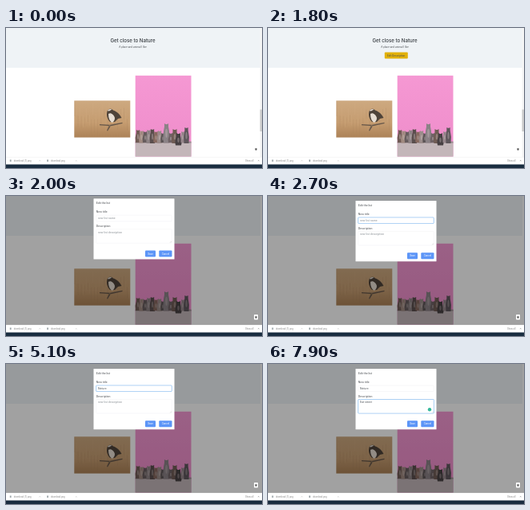
Animation of 320 by 176 pixels, one loop 8000 ms. Source, as an HTML page:

```html
<!DOCTYPE html>
<html lang="en">
<head>
<meta charset="utf-8">
<title>Edit the list</title>
<style>
  html, body { margin: 0; width: 100%; height: 100%; overflow: hidden; background: #fff; }
  svg { display: block; width: 100vw; height: 100vh; }
  text { font: 3.5px Roboto, "Liberation Sans", sans-serif; fill: #4b4f53; white-space: pre; }
  .mid { text-anchor: middle; }
  .heading { font: 500 6.1px Inter, sans-serif; fill: #33383d; }
  .sub { font: 3.05px Inter, sans-serif; }
  .bar text { font-size: 2.8px; fill: #888; }
  .button text { fill: #fff; font-size: 3.1px; }
  .field { fill: #fff; stroke-width: .45; }
</style>
</head>
<body>
<svg viewBox="0 0 320 176" preserveAspectRatio="none">
  <defs>
    <linearGradient id="reeds" x2="0" y2="1">
      <stop offset="0" stop-color="#cda980"/>
      <stop offset=".6" stop-color="#c59c70"/>
      <stop offset="1" stop-color="#ac8257"/>
    </linearGradient>
    <linearGradient id="wall" x2="0" y2="1">
      <stop offset="0" stop-color="#f598d3"/>
      <stop offset="1" stop-color="#ee8cca"/>
    </linearGradient>
  </defs>

  <rect width="320" height="176" fill="#fff"/>
  <rect width="318" height="50" fill="#eff3f6"/>
  <text class="heading mid" x="158.5" y="18.4">Get close to Nature</text>
  <text class="sub mid" x="158.5" y="25">A place and animal I like</text>
  <g id="edit">
    <rect id="editFace" x="145.8" y="30.6" width="29" height="7.900" rx="1"/>
    <text class="mid" x="160.2" y="35.7" style="font-size:3.2px">Edit Description</text>
  </g>

  <g>
    <rect x="85.300" y="91.300" width="70" height="46.300" fill="url(#reeds)"/>
    <g id="stalks" stroke-width=".5"/>
    <path d="M117 121L130 121.800L145.500 118.800V120L131 123.300L117 122.200Z M129 122.500L126 129L127 129.500L131 123Z" fill="#66574a"/>
    <path d="M127 103.500C129 101 132.500 101.500 134 103.500C138 104.500 142 108 144.500 113L140 114L136 118L130 118C126 114 125 108 127 103.500Z" fill="#4e4339"/>
    <path d="M128 108C131 106 135 109 136 113Q136 117 132.500 119Q128 116 128 108Z M126.800 104Q129 101 132.500 102.500L128.500 104.500Z" fill="#e6ddd2"/>
  </g>

  <g>
    <rect x="161.700" y="59.800" width="69.800" height="101.800" fill="url(#wall)"/>
    <rect x="161.700" y="143" width="69.800" height="18.600" fill="#c3b6b9"/>
    <rect x="161.700" y="142.600" width="69.800" height="2" fill="#9c8b91"/>
    <g id="animals"/>
  </g>

  <g id="scrollbar">
    <rect x="317.5" width="2.5" height="162" fill="#f5f5f5"/>
    <rect x="317.6" y="102.500" width="2.200" height="27.500" fill="#c8c8c8"/>
  </g>

  <rect id="shade" width="320" height="162"/>
  <rect x="310" y="149" width="5" height="6.6" rx=".8" fill="#fff"/>
  <path d="M311.400 151.300H313.600V153.200H312.800V154H312V153.200H311.400Z" fill="#555"/>

  <g id="modal">
    <rect x="109.500" y="6" width="101" height="76.300" rx=".6" fill="#fff"/>
    <text x="112.8" y="13">Edit the list</text>
    <text x="112.8" y="24.200">New title</text>
    <rect class="field" id="titleBox" x="112.700" y="27" width="94.500" height="7.600" rx=".8"/>
    <text id="titleText" x="115" y="32"/>
    <text x="112.8" y="41.700">Description</text>
    <rect class="field" id="noteBox" x="112.700" y="44.500" width="94.700" height="17.500" rx=".8"/>
    <text id="noteText" x="115" y="49.400"/>
    <path d="M205.200 61.200L206.700 59.700M206 61.200L206.700 60.500" stroke="#888" stroke-width=".25"/>
    <circle id="helper" cx="202" cy="57.300" r="2.200" fill="#35b99b"/>
    <g class="button">
      <rect x="174" y="71.300" width="13" height="7.900" rx="1" fill="#5c95f7"/>
      <text class="mid" x="180.500" y="76.300">Save</text>
      <rect x="191.300" y="71.300" width="16.200" height="7.900" rx="1" fill="#5c95f7"/>
      <text class="mid" x="199.400" y="76.300">Cancel</text>
    </g>
  </g>

  <g class="bar">
    <rect y="162" width="320" height="10" fill="#fff"/>
    <rect y="162" width="320" height=".4" fill="#e8e8e8"/>
    <rect x="4.800" y="165.500" width="1.800" height="2.500" fill="#a0a8ac"/>
    <text x="9.800" y="167.900">download (1).png</text>
    <path d="M41.500 167.300L42.300 166.500L43.100 167.300M87.200 167.300L88 166.500L88.800 167.300" fill="none" stroke="#888" stroke-width=".4"/>
    <rect x="51.200" y="165.500" width="1.800" height="2.500" fill="#a0a8ac"/>
    <text x="56" y="167.900">download.png</text>
    <text x="299" y="167.600">Show all</text>
    <path d="M315 166L316.400 167.400M316.400 166L315 167.400" stroke="#777" stroke-width=".4"/>
    <rect y="171.500" width="320" height="4.500" fill="#192d40"/>
  </g>
</svg>
<script>
const $ = id => document.getElementById(id);
const progress = (t, start, length) => Math.max(0, Math.min(1, (t - start) / length));
const easeOut = p => 1 - Math.pow(1 - p, 1.75);
const mix = (a, b, p) => `rgb(${a.map((v, i) => Math.round(v + (b[i] - v) * p))})`;

function add(parent, tag, attributes) {
  const node = document.createElementNS('http://www.w3.org/2000/svg', tag);
  for (const key in attributes) node.setAttribute(key, attributes[key]);
  parent.append(node);
}

let seed = 7;
const random = () => (seed = seed * 16807 % 2147483647) / 2147483647;
for (let i = 0; i < 34; i++) {
  const x = 86 + i * 2.05, y = 92 + random() * 25;
  add($('stalks'), 'path', {
    d: `M${x} ${y}v${8 + random() * 12}`,
    stroke: i % 2 ? '#d6b38b' : '#a17f5c', opacity: .35
  });
}

// Sitting animals: centre, top, width, base, coat
const animals = [
  [165, 128, 6, 144, '#705b55'], [169.500, 129, 6, 144.5, '#a08a80'],
  [174, 130, 6, 144, '#665c5d'], [178.500, 128, 6, 145, '#8e8385'],
  [183, 127, 6, 145, '#5a4e4d'], [187.500, 130, 6, 144, '#86695f'],
  [192, 129, 6, 145, '#9b8c8a'], [196, 132, 5, 144, '#5b5355'],
  [200.500, 120, 7, 144.5, '#8b8286'], [206, 132, 6, 144, '#6f6265'],
  [211, 127, 7, 145, '#705c55'], [215.500, 132, 7, 147.500, '#474043'],
  [221, 130, 5, 144, '#95858a'], [225.500, 125, 6, 145, '#5e565b']
];
for (const [x, top, w, base, coat] of animals) {
  const r = w * .36, neck = top + r * 1.7;
  add($('animals'), 'path', {
    d: `M${x - r} ${neck}L${x - r} ${top}L${x - r / 3} ${top + r * .4}H${x + r / 3}L${x + r} ${top}
        V${neck}Q${x + w * .7} ${(neck + base) / 2} ${x + w / 2} ${base}H${x - w / 2}
        Q${x - w * .7} ${(neck + base) / 2} ${x - r} ${neck}Z`,
    fill: coat
  });
  add($('animals'), 'ellipse', {
    cx: x, cy: neck + (base - neck) * .4, rx: w * .18, ry: (base - neck) * .28,
    fill: '#d8c8c8', opacity: .35
  });
}

const titleKeys = [3500, 3800, 4100, 4300, 4500, 4600];
const noteKeys = [6300, 6600, 6800, 6900, 7000, 7100, 7300, 7400, 7700, 7900];

function type(node, words, keys, placeholder, t) {
  const typed = words.slice(0, keys.filter(k => k <= t).length);
  node.textContent = typed || placeholder;
  node.style.fill = typed ? '#53585d' : '#8d9398';
}

function focus(node, p) {
  node.style.stroke = mix([239, 240, 242], [116, 178, 235], p);
  node.style.filter = p ? `drop-shadow(0 0 .45px rgba(90,165,240,${p * .65}))` : 'none';
}

function draw(time) {
  const t = Math.floor(time % 8000 / 100) * 100;
  const shown = progress(t, 1840, 150);
  const slide = easeOut(progress(t, 1850, 300));

  $('edit').style.opacity = progress(t, 1350, 200) * (1 - progress(t, 1850, 150));
  $('editFace').style.fill = mix([255, 193, 7], [226, 177, 10], progress(t, 1550, 200));
  $('shade').style.opacity = shown * .37;
  $('scrollbar').style.display = t < 1900 ? '' : 'none';

  $('modal').style.opacity = shown;
  $('modal').setAttribute('transform', `translate(0 ${-9.2 * (1 - slide)})`);

  const leaving = progress(t, 5750, 150);
  focus($('titleBox'), progress(t, 2550, 150) * (1 - leaving));
  focus($('noteBox'), leaving);
  $('helper').style.opacity = progress(t, 5900, 200);
  type($('titleText'), 'Nature', titleKeys, 'new list name', t);
  type($('noteText'), 'Eat street', noteKeys, 'new list description', t);
}

const start = performance.now();
function tick() {
  draw(performance.now() - start);
  requestAnimationFrame(tick);
}
tick();
</script>
</body>
</html>
```
